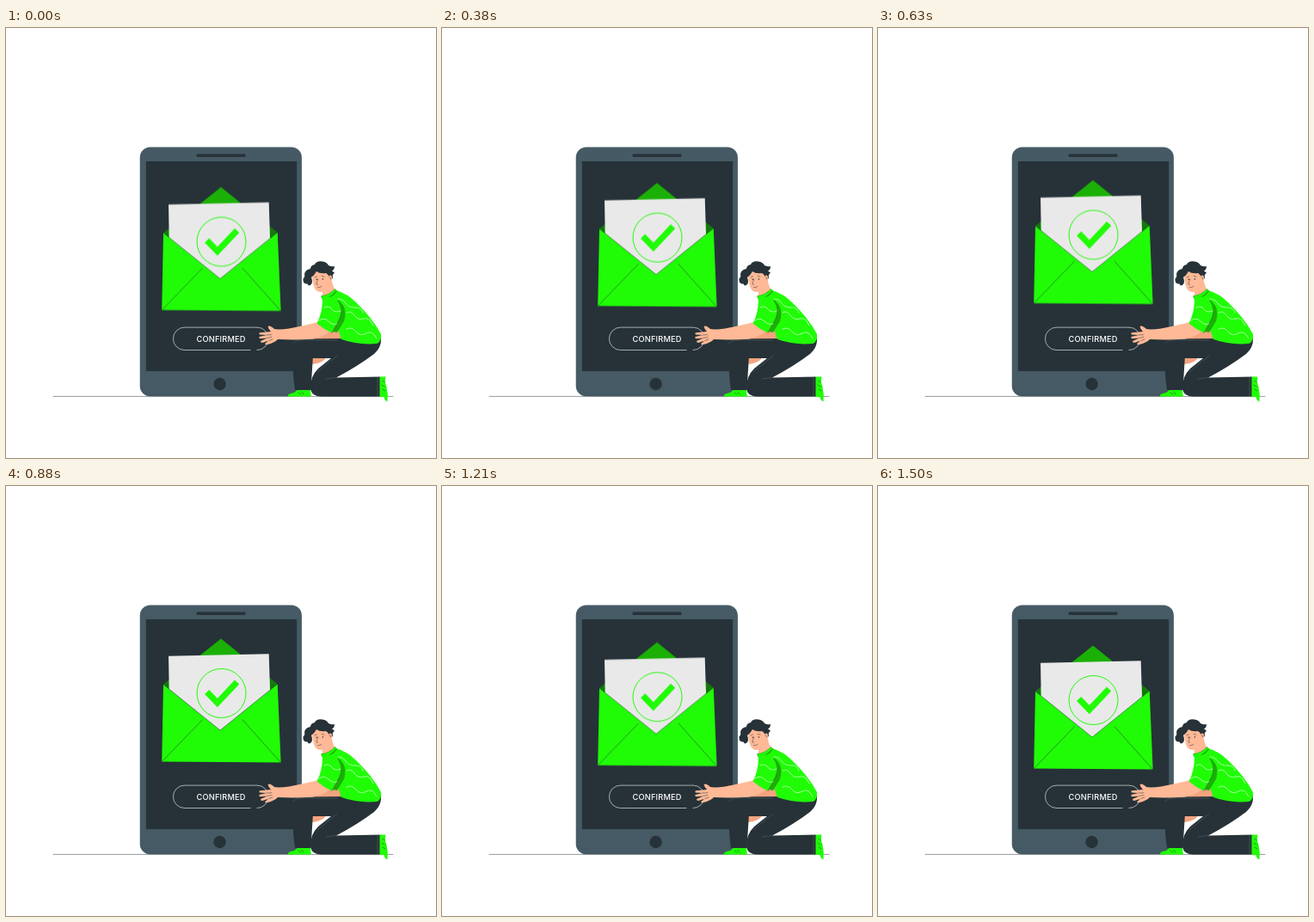
An HTML page for the animation above (1.54 s loop, 500 by 500 pixels).

```html
<!DOCTYPE html>
<html lang="en">
<head>
<meta charset="utf-8">
<title>Confirmed</title>
<style>
  html, body { margin: 0; width: 100%; height: 100%; overflow: hidden; background: #fff; }
  svg { display: block; width: 100%; height: 100%; }
  .green { fill: #20fc06; }
  .shade { fill: #1bb005; }
  .dark { fill: #263238; }
  .skin { fill: #ffb996; }
  .ink { fill: none; stroke: #263238; stroke-width: .5; stroke-linecap: round; stroke-linejoin: round; }
  .pale { fill: none; stroke: #fff; stroke-width: .6; stroke-linecap: round; }
  .seam { fill: none; stroke: #65747b; stroke-width: .4; }
  .mark { fill: none; stroke: #20fc06; }
  text { font: 500 9.2px Inter, Roboto, sans-serif; letter-spacing: .2px; fill: #fff; text-anchor: middle; }
  #mail { animation: float 1540ms linear infinite; }
  @keyframes float {
    0%, 100% { transform: translateY(-.5px); }
    48% { transform: translateY(-9.9px); }
    97.4% { transform: translateY(0); }
  }
</style>
</head>
<body>
<svg viewBox="0 0 500 500">
  <path class="ink" d="M55 428.4H450"/>

  <g id="tablet">
    <rect x="155.7" y="138.4" width="188.2" height="289.9" rx="12" fill="#455a64"/>
    <rect class="dark" x="162.8" y="155" width="175.4" height="244"/>
    <rect class="dark" x="221.5" y="146.6" width="57" height="3.4" rx="1"/>
    <circle class="dark" cx="248.6" cy="414" r="7.2"/>
  </g>

  <g id="mail">
    <path class="shade" d="M183 239L250 185.4L315.5 238.5L312 262H187Z"/>
    <path fill="#12790a" d="M183 239L189.3 234V250ZM315.5 238.5L306.5 231.5L307.5 250Z"/>
    <path fill="#e9e9e9" d="M189 205.8L305.7 203.2L307.5 262L249 294L190 262Z"/>
    <path class="green" d="M183 238.7L249 292L315.7 238.2L319.6 329.4L181.2 328.4Z"/>
    <path class="ink" d="M183 238.7L249 292L315.7 238.2M181.6 328.2L228.5 279.7M319.2 329.2L275 279.7"/>
    <circle class="mark" cx="250.5" cy="249" r="28.5" stroke-width="1"/>
    <path class="mark" stroke-width="7.2" d="M233.6 247.6L245.8 260.1L268.6 236"/>
  </g>

  <path class="pale" d="M284 374.5H207.6a13.2 13.2 0 0 1 0-26.4H292a13.2 13.2 0 0 1 0 26.4"/>
  <text x="250.1" y="365.1">CONFIRMED</text>

  <g id="man">
    <!-- far arm, wrapped around the thigh -->
    <path fill="#f3a47f" d="M380 346L390 350L392 363H357L361 358ZM356 382H373Q369 390 356 391Z"/>

    <!-- far leg and shoe -->
    <path class="green" d="M327.5 428.4Q328 425 335 424L340 420H354Q354 424 355 428.4Z"/>
    <path class="ink" d="M340 424L343 426M344 423L346 426"/>
    <path class="dark" d="M398 361L344 361.5Q333 362 332.8 372Q333 399 336 421H354.5L356.8 384H388Z"/>

    <!-- near leg and shoe -->
    <path class="green" d="M434 405.5H441.5Q440 412 442.5 417Q444.5 426 443.5 434.5Q440 433 439.5 429H434Z"/>
    <path class="ink" d="M438 410L440 412M437 415L440 417M438 420L441 422"/>
    <path class="dark" d="M393 359L435 356Q439 369 428 379Q408 394 384 406.5L434.5 405.5V428.5H367Q354 428 354 418Q354 405 363 396L388 376Z"/>
    <path class="seam" d="M333.5 367Q336 363 344 363H385M385 381L362 400M372 408L384 406.5M432 406V428"/>

    <!-- head -->
    <path class="skin" d="M368 314L368 300L378 288Q379 298 383 306Q377 314 368 314Z"/>
    <path class="skin" d="M356 285Q356 296 359 303Q363 309 370 306Q376 302 379 290L374 280H359Z"/>
    <path class="dark" d="M355 298Q352 301 350.5 297.5Q345 298 345.5 291.5Q348 290 347 286Q348 281 354 280Q354 276 359 275Q361 270.5 368 271.5Q373 272 375 276Q379 278 382 277Q382 281 379 282.5L382 284.5Q379 287 380 291L376 293Q376 287 372 285Q365 286 361 283Q359 287 355 290Q357 295 355 298Z"/>
    <ellipse class="skin" cx="377" cy="290.5" rx="2" ry="3"/>
    <path class="ink" d="M376.5 289.5Q378 290 377.5 292M359 290L361.5 288.8M367 288.3L370 289.2M363 292Q360.5 296 361 298L362.5 298.2M362.5 301.5Q365 302.5 367 300.5"/>
    <circle class="dark" cx="361.3" cy="292.2" r=".8"/>
    <circle class="dark" cx="368.4" cy="292" r=".8"/>

    <!-- shirt -->
    <path class="green" d="M367 313Q379 312 384 305Q397 309 407 319Q426 337 436 356Q437 365 431 367Q410 369 390 362L386 350L372 326Z"/>
    <path class="shade" d="M386 316Q398 325 393 341L385 354L380 353L388 338Z"/>
    <path class="pale" d="M386 315Q392 315 395 320T406 325T415 331M396 331Q401 328 405 334T416 338T427 346M396 350Q402 347 407 353T419 355T431 361"/>
    <path class="shade" d="M366 311.5Q377 310 382.5 303L385 306Q380 314 368 316Z"/>
    <path class="green" d="M366.6 312Q377 310.5 382.5 303.5L383.8 305.5Q378 313 368 315Z"/>

    <!-- near arm -->
    <path class="skin" d="M363 342Q343 347 329 349.5Q317 351 312 350Q307 345 304.5 347Q305 350 308 353L295 354.3Q293.5 355.5 295 356.4L303 357L294.5 359Q293.5 360.5 295.5 361.2L304 360.5L296 364Q296 366 298 366L306 363.5L301 367Q302 368.8 304 368Q312 366 316 362Q338 363 357 361.5Q370 359 378 352Z"/>
    <path class="ink" d="M303 357L309 356.7M304 360.5L309 359.4M306 363.5L310 362"/>
    <path class="green" d="M368 315Q380 309 387 318Q393 327 388 338L379 354.5Q369 350 361.5 343.5Q368 331 368 315Z"/>
    <path class="ink" d="M386 317Q393 327 388 338L379 354.5"/>
    <path class="pale" d="M370 325Q375 322 379 327T389 329M364 340Q370 336 375 341T385 344"/>
  </g>
</svg>
</body>
</html>
```
